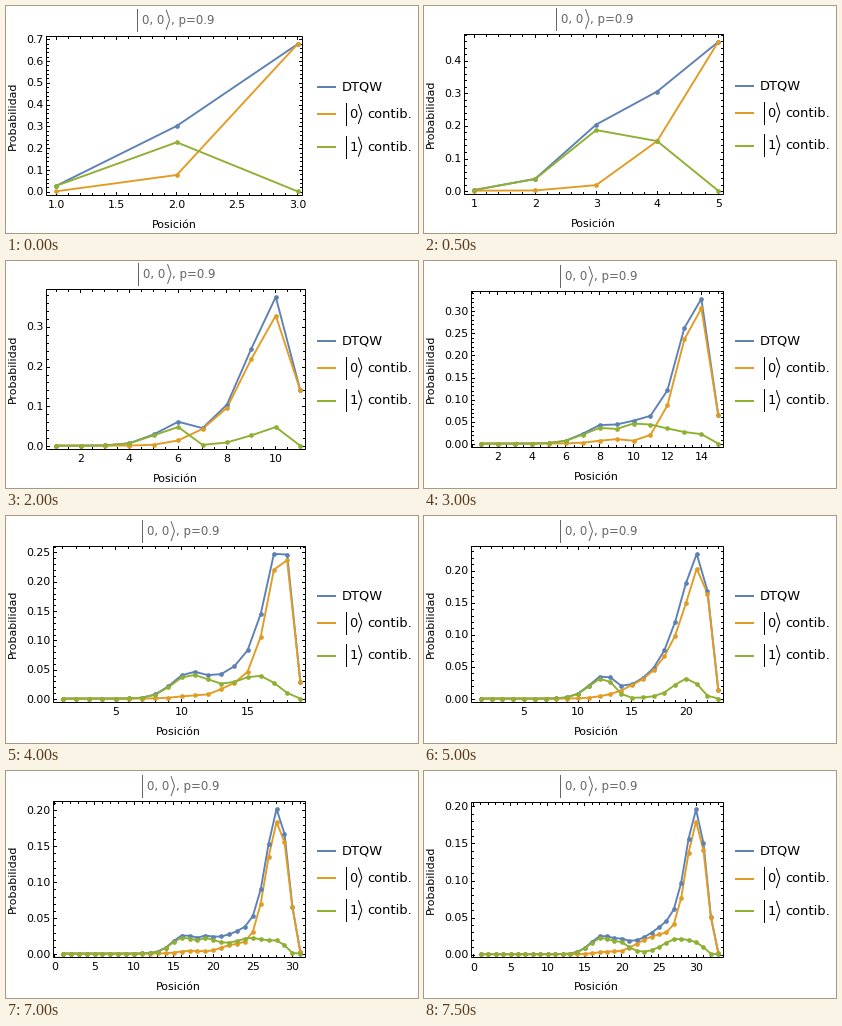
Recreate the animation shown at these times as a matplotlib script. Size 412x227 px, loop 8 s.

```python
import math

import matplotlib.pyplot as plt
import numpy as np
from matplotlib.animation import FuncAnimation

W, H, DPI = 412, 227, 64
PX = 72 / DPI  # points per pixel
BLUE, ORANGE, GREEN = "#5e81b5", "#e19c24", "#8fb032"
GRAY = "#666666"
P_SHIFT = 0.9
COS, SIN = math.sqrt(0.75), 0.5
GOLDEN = (1 + math.sqrt(5)) / 2
CENTER_Y = 107.4
FRAMES = 16

plt.rcParams["font.family"] = "DejaVu Sans"
fig = plt.figure(figsize=(W / DPI, H / DPI), dpi=DPI, facecolor="white")
ax = fig.add_axes([0, 0, 1, 1])


def walk(steps):
    """Coined walk blurred by a biased random drift: probabilities per coin."""
    up, down = np.zeros(steps + 1), np.zeros(steps + 1)
    up[0] = 1
    for _ in range(steps):
        up, down = COS * up + SIN * down, np.roll(SIN * up - COS * down, 1)
    drift = [math.comb(steps, k) * P_SHIFT ** (steps - k) * (1 - P_SHIFT) ** k
             for k in range(steps + 1)]
    return [np.convolve(a ** 2, drift)[::-1] for a in (up, down)]


def pick_step(span, choices):
    return next(s for s in choices if span / s <= 7.42)


def ticks(lo, hi, step):
    first = math.ceil(lo / step - 1e-6)
    last = math.floor(hi / step + 1e-6)
    return [k * step for k in range(first, last + 1)]


def line(xs, ys, color="black", width=1.0, **kw):
    ax.plot(xs, ys, color=color, lw=width * PX, **kw)


def text(x, y, s, size=11, color="black", ha="left", **kw):
    ax.text(x, y, s, fontsize=size * PX, color=color, ha=ha, va="baseline", **kw)


def ket(x, y, s, gap, angle, size, color="black"):
    line([x, x], [y - 11, y + 11], color)
    text(x + gap, y + 4.2, s, size, color)
    line([x + angle, x + angle + 3.3, x + angle], [y - 9.5, y, y + 9.5], color)


def crisp(v):
    return math.floor(v) + 0.5


def draw_ticks(left, right, top, bottom, xs, ys, size):
    """Tick marks on all four sides, pointing inwards."""
    for x in map(crisp, xs):
        line([x, x], [bottom, bottom - size])
        line([x, x], [top, top + size])
    for y in map(crisp, ys):
        line([left, left + size], [y, y])
        line([right, right - size], [y, y])


def draw_legend(shift):
    rows = [(79.3, BLUE), (106.5, ORANGE), (139.2, GREEN)]
    for i, (y, color) in enumerate(rows):
        y += shift
        line([311, 330], [y + 0.5, y + 0.5], color, 2, solid_capstyle="butt")
        if i == 0:
            text(336, y + 4, "DTQW", 13)
        else:
            ket(340.5, y, str(i - 1), 2.9, 12, 13)
            text(360.9, y + 4.2, "contib.", 13)


def draw(i):
    ax.clear()
    ax.set(xlim=(0, W), ylim=(H, 0))
    ax.axis("off")

    steps = i + 1
    n = 2 * steps + 1
    zero, one = walk(steps)
    total = zero + one
    peak = total.max()

    xstep = pick_step(n - 1, (0.5, 1, 2, 5))
    ystep = pick_step(peak, (0.05, 0.1))
    xdec = 1 if xstep < 1 else 0
    ydec = 1 if ystep == 0.1 else 2

    # A tick label under the last point may push the right edge inwards.
    left, right = (40.2 if ydec == 1 else 47.2), 299.2
    if n % xstep == 0:
        label = f"{n:.{xdec}f}"
        half = 5.5 * sum(0.318 if c == "." else 0.636 for c in label)
        right = min(right, 300.2 - half + 0.0195 * (right - left))
    width = right - left
    height = width / GOLDEN

    xscale = 0.942 * width / (n - 1)
    yscale = 0.929 * height / peak
    xlo, xhi = 1 - 0.0385 * width / xscale, n + 0.0195 * width / xscale
    ylo, yhi = -0.0173 * height / yscale, peak + 0.0537 * height / yscale
    xmajor = ticks(xlo, xhi, xstep)
    ymajor = ticks(ylo, yhi - 1 / yscale, ystep)

    # A tick label near the top edge pushes the plot down.
    shift = max(0, 6 - (yhi - ymajor[-1]) * yscale) / 2
    top = CENTER_Y - height / 2 + shift
    bottom = top + height
    mid = (left + right) / 2

    def px(x):
        return left + (np.asarray(x) - xlo) * xscale

    def py(y):
        return bottom - (np.asarray(y) - ylo) * yscale

    l, r, t, b = map(crisp, (left, right, top, bottom))
    line([l, r, r, l, l], [t, t, b, b, t], solid_joinstyle="miter")
    xminor = ticks(xlo, xhi, xstep / (4 if xstep == 2 else 5))
    yminor = ticks(ylo, yhi, ystep / 5)
    draw_ticks(l, r, t, b, px(xminor), py(yminor), 2)
    draw_ticks(l, r, t, b, px(xmajor), py(ymajor), 3)

    for x in xmajor:
        text(px(x), bottom + 13.8, f"{x:.{xdec}f}", ha="center")
    for y in ymajor:
        text(left - 2.8, py(y) + 4, f"{y:.{ydec}f}", ha="right")

    xs = px(np.arange(1, n + 1))
    curves = [(total, BLUE), (zero, ORANGE), (one, GREEN)]
    for values, color in curves:
        line(xs, py(values), color, 1.9, solid_joinstyle="round")
    for values, color in curves:
        line(xs, py(values), color, 0, marker="o", ms=4.7 * PX, mew=0)

    ty = top - shift - 14.4
    ket(mid - 37.2, ty, "0, 0", 4.8, 29.2, 11.8, GRAY)
    text(mid - 3.4, ty + 4.2, ", p=0.9", 11.8, GRAY)
    text(mid - 0.5, bottom + 33.6, "Posición", ha="center")
    text(9.7, (top + bottom) / 2 + 0.5, "Probabilidad", ha="center",
         rotation=90, rotation_mode="anchor")
    draw_legend(shift)
    return []


anim = FuncAnimation(fig, draw, frames=FRAMES, init_func=lambda: [],
                     interval=500, repeat=True, repeat_delay=0)
plt.show()
```
